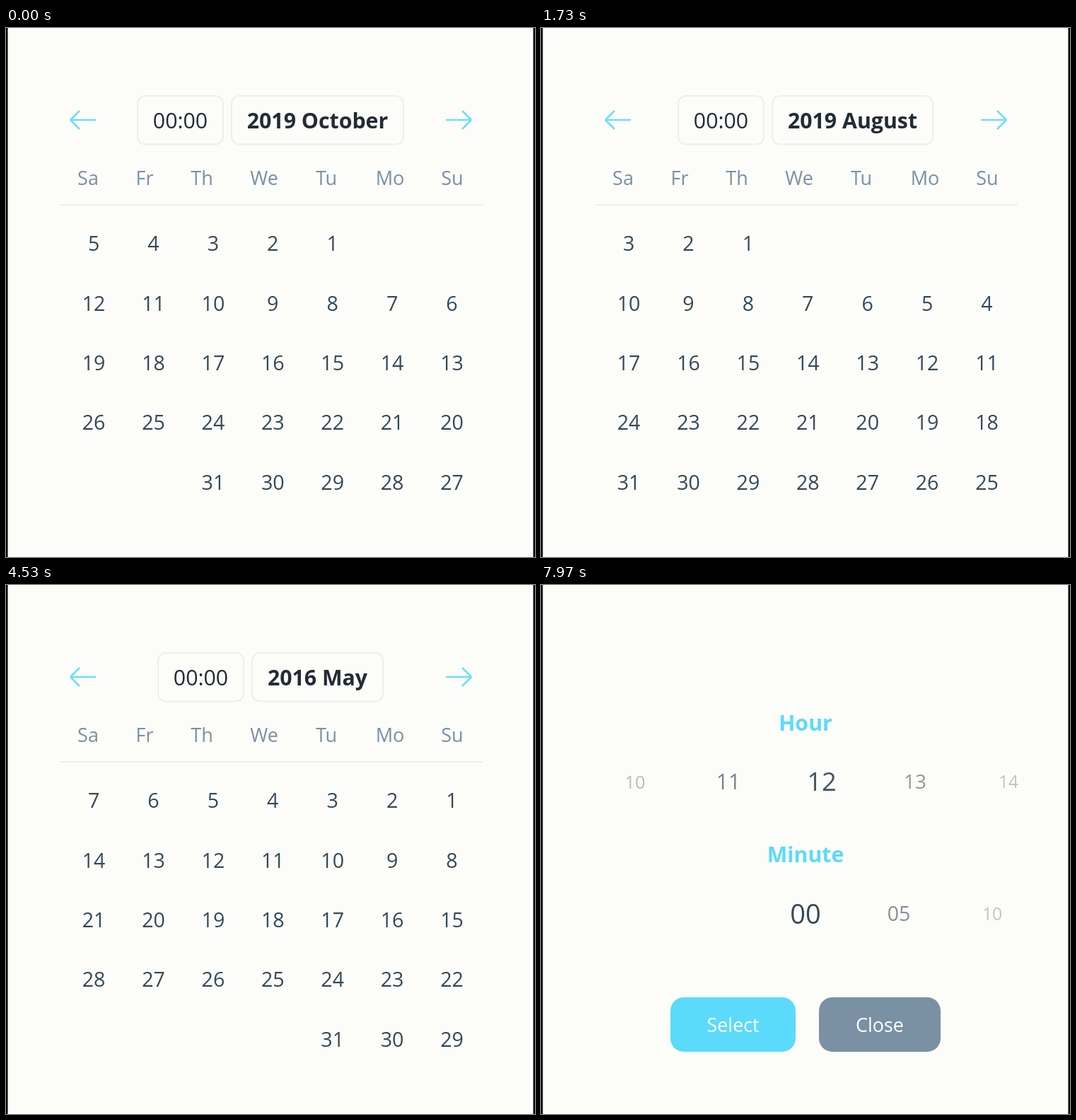
An HTML page that plays this animation: 748 px wide and 748 px high, repeating every 8000 ms.

```html
<!DOCTYPE html>
<html lang="en">
<head>
<meta charset="utf-8">
<title>Date picker</title>
<style>
  html, body { margin: 0; width: 100%; height: 100%; overflow: hidden; background: #fcfcf9; }
  svg { display: block; width: 100%; height: 100%; }
  text { font-family: "Open Sans", "Noto Sans", sans-serif; text-anchor: middle; }
</style>
</head>
<body>
<svg id="stage" viewBox="0 0 748 748"></svg>
<script>
const LOOP = 8000, CENTER = 374, HEAD_SIZE = 30.3;
const MAIN = '#5cdafb', INK = '#334a57', HEAD = '#212c35', SOFT = '#7991a3', PAPER = '#fcfcf9', LINE = '#eceef2';
const MONTHS = ['January', 'February', 'March', 'April', 'May', 'June', 'July',
  'August', 'September', 'October', 'November', 'December'];
const WEEK = [['Sa', 116], ['Fr', 196], ['Th', 277], ['We', 365], ['Tu', 453], ['Mo', 543], ['Su', 631]];

// Visible pages: start time, year, month index, width of the title box
const PAGES = [
  { at: 0, year: 2019, month: 9, width: 243 },
  { at: 733, year: 2019, month: 8, width: 286 },
  { at: 1150, year: 2019, month: 7, width: 227 },
  { at: 4330, year: 2016, month: 4, width: 185 },
];
const SLIDE = 300;
const YEAR_STEPS = [2780, 3290, 3560];
const DAY_AT = 5330;

const stage = document.getElementById('stage');
const clamp = (v, lo = 0, hi = 1) => Math.min(hi, Math.max(lo, v));
const smooth = u => { u = clamp(u); return u * u * (3 - 2 * u); };
const mix = (a, b, u) => a + (b - a) * u;

// Opacity of a touched item: dims, then recovers
const touch = (t, ...starts) => Math.min(...starts.map(s =>
  t < s ? 1 : t < s + 120 ? mix(1, .45, (t - s) / 120) : mix(.45, 1, clamp((t - s - 120) / 250))));

// Text centred on x, with its capitals centred on y
const text = (s, x, y, size, fill, extra = '') =>
  `<text x="${x}" y="${y + size * .357}" font-size="${size}" fill="${fill}" ${extra}>${s}</text>`;
const bold = 'font-weight="700"';
const box = (x, y, w, h, r, fill, extra = '') =>
  `<rect x="${x}" y="${y}" width="${w}" height="${h}" rx="${r}" fill="${fill}" ${extra}/>`;
const group = (body, attrs) => `<g ${attrs}>${body}</g>`;
const shift = (body, dx) => group(body, `transform="translate(${dx} 0)"`);

const arrow = (x, y, dir, opacity = 1) =>
  `<path d="M${x} ${y}h${-dir * 36}m${dir * 36} 0l${-dir * 13} -13m${dir * 13} 13l${-dir * 13} 13"
    fill="none" stroke="${MAIN}" stroke-width="2.6" opacity="${.88 * opacity}"/>`;

function header(page, t) {
  const left = CENTER - (133 + page.width) / 2;
  const frame = `stroke="${LINE}" stroke-width="2"`;
  const time = box(left, 96, 121, 68.5, 11, 'none', frame) + text('00:00', left + 60.5, 131, HEAD_SIZE, HEAD);
  const title = box(left + 133, 96, page.width, 68.5, 11, 'none', frame) +
    text(`${page.year} ${MONTHS[page.month]}`, left + 133 + page.width / 2, 131, HEAD_SIZE, HEAD, bold);
  return group(time, `opacity="${touch(t, 5770)}"`) + group(title, `opacity="${touch(t, 1870)}"`);
}

function days(page, t) {
  const first = new Date(page.year, page.month, 1).getDay();
  const count = new Date(page.year, page.month + 1, 0).getDate();
  let out = '';
  for (let d = 1; d <= count; d++) {
    const cell = first + d - 1;
    const x = 630.5 - cell % 7 * 84.4, y = 305 + Math.floor(cell / 7) * 84.4;
    const chosen = d === 11 && t >= DAY_AT;
    if (chosen) out += `<circle cx="${x}" cy="${y}" r="36" fill="${MAIN}"/>`;
    out += text(d, x, y, 28.6, chosen ? '#fff' : INK, d === 11 ? `opacity="${touch(t, 5230)}"` : '');
  }
  return out;
}

function calendar(t) {
  const i = PAGES.findLastIndex(p => t >= p.at);
  const page = PAGES[i], last = PAGES[i - 1];
  const sliding = i === 1 || i === 2;
  const rest = sliding ? (1 - clamp((t - page.at) / SLIDE)) ** 2.1 : 0;
  let out = arrow(91, 130, -1) + arrow(658, 130, 1, touch(t, 640, 1060));
  if (rest > 0) {
    const old = `00:00 ${last.year} ${MONTHS[last.month]}`;
    out += text(old, CENTER - 206 * (1 - rest), 131, HEAD_SIZE, HEAD, `opacity="${rest}"`);
  }
  out += shift(header(page, t), 206 * rest);
  out += WEEK.map(([name, x]) => text(name, x, 212.5, 27, SOFT)).join('');
  out += box(76, 249, 598, 2, 0, LINE);
  return out + group(shift(days(page, t), 412 * rest), 'clip-path="url(#grid)"');
}

// Full-size sheet that fades in while shrinking to its place
const sheet = (body, p) => p <= 0 ? '' : group(box(-40, -40, 828, 828, 0, PAPER) + body,
  `opacity="${p}" transform="translate(374 390) scale(${1.1 - .1 * p}) translate(-374 -390)"`);

function monthPicker(t) {
  const year = 2019 - YEAR_STEPS.filter(s => t >= s).length;
  const chosen = t < 4260 ? 7 : 4;
  let out = arrow(173, 173, -1) + arrow(575, 173, 1, touch(t, ...YEAR_STEPS.map(s => s - 80)));
  out += text(year, CENTER, 174, 30.9, HEAD, bold + ' style="font-family:Roboto,sans-serif"');
  MONTHS.forEach((name, m) => {
    const x = [560, 377, 192.5][m % 3], y = 324 + Math.floor(m / 3) * 97.7;
    if (m === chosen) out += box(x - 83.5, y - 35, 167, 68, 25, MAIN);
    out += text(name, x, y, 26.9, m === chosen ? '#fff' : INK, m === 4 ? `opacity="${touch(t, 4130)}"` : '');
  });
  return out;
}

function wheel(y, pos, count, step) {
  let out = '';
  for (let n = 0; n < count; n++) {
    const off = Math.abs(n - pos);
    if (off > 3.2) continue;
    const size = 38 * (off < 1 ? mix(1, .75, off) : mix(.75, .65, clamp(off - 1)));
    const alpha = off < 1 ? mix(1, .6, off) : mix(.6, .3, clamp(off - 1));
    out += text(String(n * step).padStart(2, '0'), CENTER + (n - pos) * 132, y, size, INK, `opacity="${alpha}"`);
  }
  return group(out, 'clip-path="url(#wheel)"');
}

function timePicker(t) {
  const u = Math.max(0, t - 7130) / 135.5;
  const hour = 12 * (1 - (1 + u) * Math.exp(-u));
  return text('Hour', CENTER, 195, HEAD_SIZE, MAIN, bold) + wheel(278.5, hour, 24, 1) +
    text('Minute', CENTER, 381.5, HEAD_SIZE, MAIN, bold) + wheel(465, 0, 12, 5) +
    box(183, 583, 177, 77, 19, MAIN) + text('Select', 271.5, 622, 26.9, '#fff') +
    box(393, 583, 172, 77, 19, SOFT) + text('Close', 479, 622, 26.9, '#fff');
}

const DEFS = `<clipPath id="grid"><rect x="75" y="252" width="599" height="460"/></clipPath>
  <clipPath id="wheel"><rect x="44" y="220" width="660" height="300"/></clipPath>`;

function draw(now) {
  const t = now % LOOP;
  const months = smooth((t - 2070) / 200) - smooth((t - 4330) / 200);
  const clock = smooth((t - 6030) / 200);
  const covered = months >= 1 || clock >= 1;
  stage.innerHTML = DEFS + box(0, 0, 748, 748, 0, PAPER) + (covered ? '' : calendar(t)) +
    sheet(monthPicker(t), months) + sheet(timePicker(t), clock) +
    box(0, 0, 2.5, 748, 0, '#000') + box(745.5, 0, 2.5, 748, 0, '#000');
  requestAnimationFrame(draw);
}
requestAnimationFrame(draw);
</script>
</body>
</html>
```
